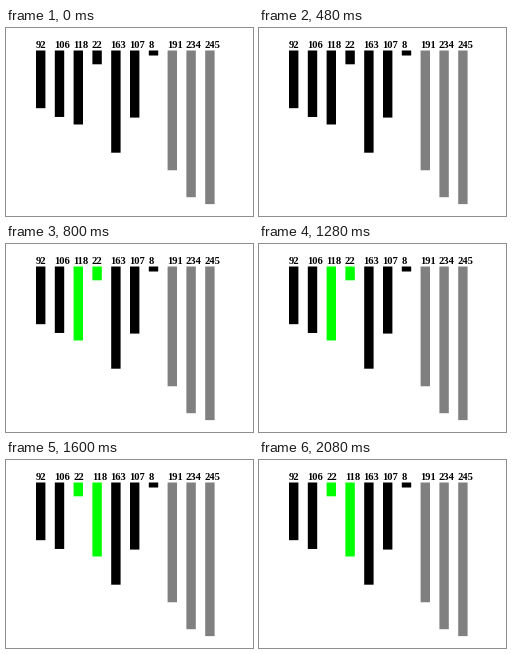
Animation of 247x188 px, one loop 2.4 s. Source, as a matplotlib script:

```python
import matplotlib.pyplot as plt
from matplotlib.animation import FuncAnimation
from matplotlib.patches import Rectangle

W, H, DPI = 247, 188, 100
LEFT, TOP, PITCH, BAR_W = 30, 22.5, 18.8, 9.4
SCALE = 0.627          # pixels per unit of value
BASELINE = 20
FONT_PX = 10.5

values = [92, 106, 118, 22, 163, 107, 8, 191, 234, 245]
SORTED_FROM = 7        # bars from here on are already in place
PAIR = (2, 3)          # neighbours being compared

fig = plt.figure(figsize=(W / DPI, H / DPI), dpi=DPI, facecolor="white")
ax = fig.add_axes([0, 0, 1, 1])
ax.set_xlim(0, W)
ax.set_ylim(H, 0)
ax.axis("off")

bars, labels = [], []
for i in range(len(values)):
    x = LEFT + i * PITCH
    bar = Rectangle((x, TOP), BAR_W, 0, linewidth=0, snap=False)
    bars.append(ax.add_patch(bar))
    labels.append(ax.text(x - 0.6, BASELINE, "", family="Liberation Serif",
                          weight="bold", size=FONT_PX * 72 / DPI,
                          ha="left", va="baseline", color="black"))


def bar_color(i, step):
    if step > 0 and i in PAIR:
        return "#00ff00"
    return "#808080" if i >= SORTED_FROM else "black"


def draw(step):
    """Step 0: at rest, 1: pair highlighted, 2: pair swapped."""
    order = list(values)
    if step == 2:
        a, b = PAIR
        order[a], order[b] = order[b], order[a]
    for i, (bar, label, value) in enumerate(zip(bars, labels, order)):
        bar.set_height(value * SCALE)
        bar.set_facecolor(bar_color(i, step))
        label.set_text(str(value))
    return bars + labels


anim = FuncAnimation(fig, draw, frames=3, interval=800, repeat=True,
                     repeat_delay=0, init_func=lambda: draw(0))
plt.show()
```
